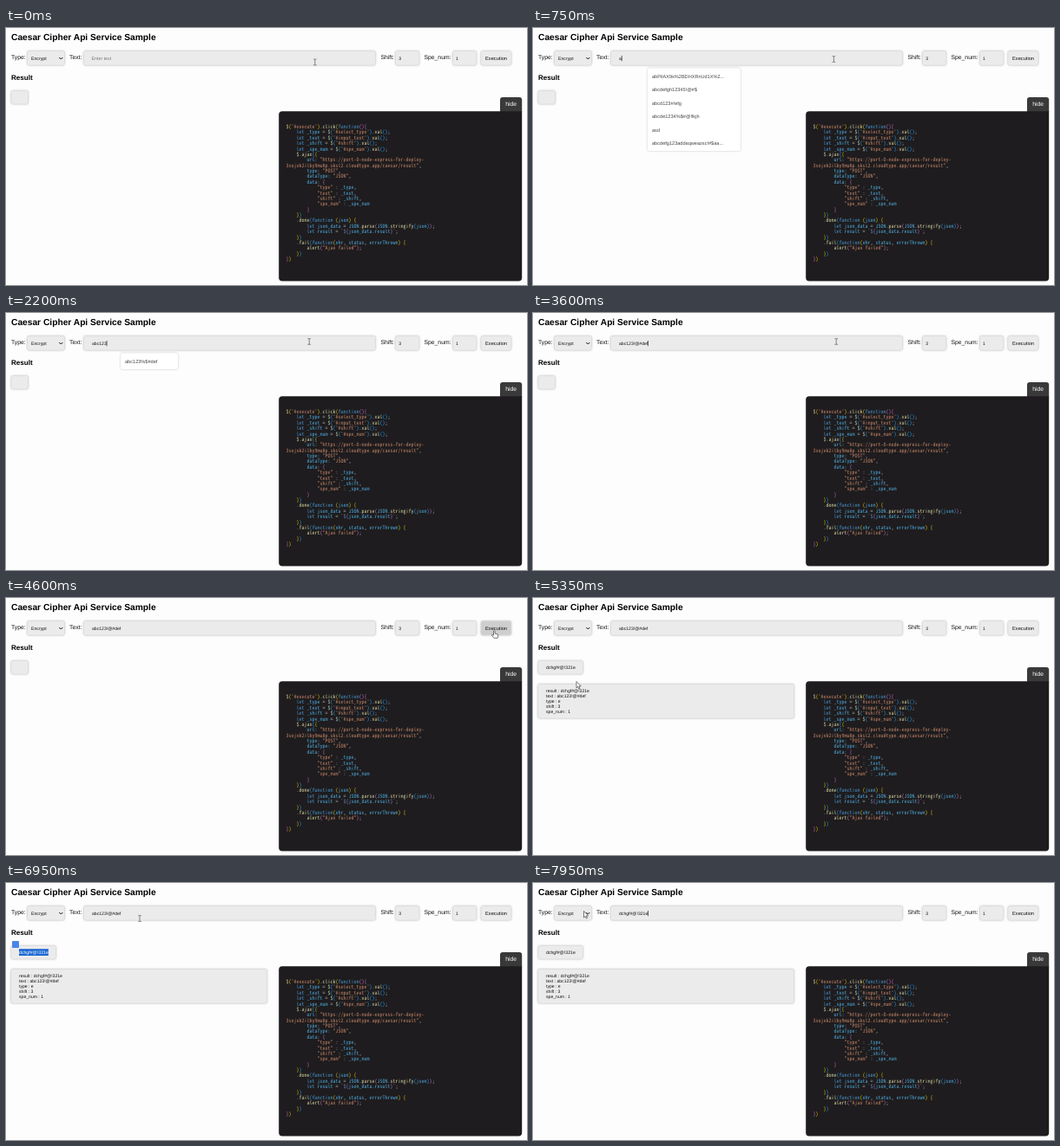
An HTML page for the animation above (8000 ms loop, 600 by 297 pixels).

```html
<!DOCTYPE html>
<html lang="en">
<head>
<meta charset="utf-8">
<title>Caesar Cipher Api Service Sample</title>
<style>
html, body { margin: 0; width: 100%; height: 100%; overflow: hidden; background: #fdfdfd; }
svg { display: block; width: 600px; height: 297px; }
text { font-family: "Liberation Sans", Arial, sans-serif; font-size: 5.1px; fill: #111; white-space: pre; text-rendering: geometricPrecision; }
.h { font-weight: bold; fill: #000; }
.label { font-size: 6.8px; }
.field { fill: #ecebec; stroke: #dad9da; stroke-width: .6; filter: drop-shadow(0 0 .8px #ccc); }
.menu { fill: #fff; filter: drop-shadow(0 .5px .8px #c4c4c4); }
.item { font-size: 5.6px; fill: #444; }
.code text { font-family: "Noto Sans Mono CJK KR", "Noto Sans Mono CJK JP", "Noto Sans Mono CJK SC", "Liberation Mono", monospace; font-size: 6px; }
</style>
</head>
<body>
<svg id="stage" viewBox="0 0 600 297"></svg>
<script>
const LOOP = 8000, STEP = 50;
const PLAIN = 'abc123!@#def', CIPHER = 'dchgf#@!321e';
const stage = document.getElementById('stage');

function add(tag, attrs, parent = stage, content) {
  const el = document.createElementNS('http://www.w3.org/2000/svg', tag);
  for (const k in attrs) el.setAttribute(k, attrs[k]);
  if (content !== undefined) el.textContent = content;
  parent.appendChild(el);
  return el;
}
const label = (x, y, s, attrs = {}, parent) => add('text', { x, y, ...attrs }, parent, s);
const box = (x, y, width, height, attrs = {}, parent) =>
  add('rect', { x, y, width, height, rx: 2.2, class: 'field', ...attrs }, parent);
const show = (el, on) => el.setAttribute('visibility', on ? 'visible' : 'hidden');
const setText = (el, s) => { if (el.textContent !== s) el.textContent = s; };

// Form
label(6, 13.8, 'Caesar Cipher Api Service Sample', { class: 'h', style: 'font-size:10.22px' });
[[6, 'Type:'], [73, 'Text:'], [431.5, 'Shift:'], [481.5, 'Spe_num:']]
  .forEach(([x, s]) => label(x, 36.4, s, { class: 'label' }));
box(24.5, 26.6, 43, 16.4);
label(29, 36.6, 'Encrypt', { style: 'font-size:5.2px' });
add('path', { d: 'M61.3 34l2 2 2-2', fill: 'none', stroke: '#111', 'stroke-width': 1 });
box(89.5, 26.6, 336, 16.4);
box(448.5, 26.6, 27.3, 16.4);
label(452.3, 36.8, '3');
box(514.5, 26.6, 27.3, 16.4);
label(518, 36.8, '1');
const button = box(547, 26.6, 34.8, 16.4);
label(552, 36.6, 'Execution', { style: 'font-size:5.7px' });
const hint = label(98.5, 36.6, 'Enter text', { style: 'font-size:5.3px;fill:#777' });
const mark = add('rect', { y: 31, height: 8, fill: '#1967d2' });
const typed = label(99, 36.6, '');
const caret = add('rect', { y: 32, width: .6, height: 6.2, fill: '#000' });

// Result
label(6, 60.4, 'Result', { class: 'h', style: 'font-size:8.1px' });
const resultBox = box(6, 72.4, 19.5, 15.5);
const answer = add('g', {});
const picked = add('rect', { y: 76.2, height: 7.8, fill: '#1967d2' }, answer);
const output = add('text', { x: 15, y: 82, style: 'font-size:5.2px' }, answer);
const head = add('tspan', {}, output);
const tail = add('tspan', { fill: '#fff' }, output);
box(5.7, 99.5, 295, 39.5, {}, answer);
['result : ' + CIPHER, 'text : ' + PLAIN, 'type : e', 'shift : 3', 'spe_num : 1']
  .forEach((s, i) => label(15, 109 + 6 * i, s, {}, answer));
const badge = add('rect', { x: 7, y: 67, width: 8, height: 8, rx: 1, fill: '#4a86e8' });

// Code panel
add('path', { d: 'M569 97V83q0-3 3-3h19.2q3 0 3 3v14z', fill: '#3a393a' });
label(575.3, 90, 'hide', { class: 'label', style: 'fill:#fff' });
add('path', { d: 'M318.2 96.2H594.2V288.4q0 4-4 4H318.2q-4 0-4-4V100.2q0-4 4-4z', fill: '#1e1c1e' });
const code = add('g', { class: 'code' });
const lines = String.raw`$('#execute').click(function(){
    let _type = $('#select_type').val();
    let _text = $('#input_text').val();
    let _shift = $('#shift').val();
    let _spe_num = $('#spe_num').val();
    $.ajax({
        url: "https://port-0-node-express-for-deploy-
3sojxk2ilby9mu8p.sksl2.cloudtype.app/caesar/result",
        type: "POST",
        dataType: "JSON",
        data: {
            "type" : _type,
            "text" : _text,
            "shift" : _shift,
            "spe_num" : _spe_num
        }
    })
    .done(function (json) {
        let json_data = JSON.parse(JSON.stringify(json));
        let result = ~\${json_data.result}~;
    })
    .fail(function(xhr, status, errorThrown) {
        alert("Ajax failed");
    })
})`.replace(/\\/g, '').replace(/~/g, '`').split('\n');
const TOKEN = /(^3\S+"|"[^"]*"?|'[^']*'|`)|(\b(?:let|function)\b|\$(?=\{))|(\$|\w+(?=\())|([(){}])|(\w+)|([^\w$"'`(){}]+)/g;
const PAIRS = ['#e6c200', '#c868c4', '#179fff'];
const PITCH = 3;
const probe = label(0, 0, 'mmmmmmmmmm', {}, code);
code.style.letterSpacing = (PITCH - probe.getComputedTextLength() / 10).toFixed(2) + 'px';
probe.remove();
let depth = 0;
function paint(m) {
  if (m[1]) return '#c08468';
  if (m[2]) return '#4a94cc';
  if (m[3]) return '#d2d2a0';
  if (m[4]) return PAIRS[('({'.includes(m[4]) ? depth++ : --depth) % 3];
  return m[5] ? '#4fa8d8' : '#c8c8c8';
}
lines.forEach((line, i) => {
  const body = line.trimStart();
  const row = add('text', { x: 322.4 + PITCH * (line.length - body.length), y: 116 + 6.38 * i }, code);
  for (const m of body.matchAll(TOKEN)) add('tspan', { style: 'fill:' + paint(m) }, row, m[0]);
});

// Autofill menus
function menu(width, items) {
  const g = add('g', {});
  box(132, 46.3, width, 3.3 + 15.4 * items.length, { class: 'menu' }, g);
  items.forEach((s, i) => label(137, 58 + 15.4 * i, s, { class: 'item' }, g));
  return g;
}
const first = 'abPilAX9s%2BDHXRnUd1X%2...';
const common = ['abcdefgh12345!@#$', 'abcd123#!efg', 'abcde1234%$#@!lkjh'];
const long = 'abcdefg123addaqweazsc!#$aa...', last = 'abc123%$#def';
const menus = [
  [750, 950, menu(107, [first, ...common, 'asd', long])],
  [950, 1450, menu(107, [first, ...common, long, last])],
  [1450, 1650, menu(107, [...common, long, last])],
  [1650, 2250, menu(66, [last])]
];

// Pointers
const pointer = add('g', {});
const beam = add('path', { d: 'M-1.8-3.4h1.3l.5.4.5-.4h1.3M0-3V3M-1.8 3.4h1.3l.5-.4.5.4h1.3', fill: 'none', stroke: '#3a3a3a', 'stroke-width': .6 }, pointer);
const arrow = add('path', { d: 'M0 0V7.4L1.7 5.9 2.8 8.4 4 7.9 2.9 5.4H5.2z', fill: '#fff', stroke: '#222', 'stroke-width': .6 }, pointer);
const hand = add('path', { d: 'M-1-3.4q.8-1 1.6 0v3l3 .7q.8.3.7 1.2l-.6 3.3H-.6L-3 1.6q0-1 1-.8l1 .8z', fill: '#fff', stroke: '#222', 'stroke-width': .6 }, pointer);

const path = [
  [0, 355.8, 39.5], [50, 355.4, 39.3], [500, 346.4, 36], [1450, 346.4, 36],
  [1800, 349.2, 33], [3650, 349.2, 33], [4350, 537, 39], [4550, 562.5, 41.5], [4800, 562.5, 41.5],
  [5250, 50, 96.5], [5350, 50, 96.5], [5550, 76, 111], [5800, 27, 100], [6050, 50, 80],
  [6100, 50, 80], [6350, 14, 80], [6450, 14, 80], [6600, 154, 60], [6750, 154, 60],
  [6900, 154, 41], [7600, 154, 41], [7900, 58.5, 32.5], [LOOP, 58.5, 32.5]
];
const keys = [
  [0, ''], ...[750, 950, 1450, 1650, 1800, 2000, 2250, 2450, 2750, 3150, 3350, 3550]
    .map((t, i) => [t, PLAIN.slice(0, i + 1)]), [7500, CIPHER]
];
const EXEC = 4800, DRAG = 6100, DRAG_END = 6350, UNPICK = 7050, ALL = 7250, PASTE = 7500;

function place(t) {
  const i = Math.max(1, path.findIndex(p => p[0] > t));
  const [a, x, y] = path[i - 1], [b, u, v] = path[i];
  const k = (t - a) / (b - a), e = k * k * (3 - 2 * k);
  return [x + (u - x) * e, y + (v - y) * e];
}
const within = (x, y, l, t, r, b) => x >= l && x <= r && y >= t && y <= b;

function draw(t) {
  const [x, y] = place(t);
  const onButton = within(x, y, 547, 26, 582, 44);
  const onText = within(x, y, 89, 26, 426, 44) || within(x, y, 448, 26, 476, 44) ||
    within(x, y, 514, 26, 542, 44) || (t >= 6000 && within(x, y, 13, 75, 52, 86));
  pointer.setAttribute('transform', `translate(${x} ${y})`);
  show(hand, onButton);
  show(beam, onText);
  show(arrow, !onButton && !onText);
  button.style.fill = onButton ? '#cfcecf' : '';

  const [since, text] = keys.filter(k => k[0] <= t).pop();
  setText(typed, text);
  show(hint, !text);
  const width = text ? typed.getComputedTextLength() : 0;
  const all = t >= ALL && t < PASTE;
  show(mark, all);
  mark.setAttribute('x', 99);
  mark.setAttribute('width', width);
  typed.style.fill = all ? '#fff' : '';
  const focus = (t >= 500 && t < 4550) || (t >= UNPICK && !all);
  const from = t >= UNPICK && t < PASTE ? UNPICK : Math.max(since, 500);
  caret.setAttribute('x', 99 + width);
  show(caret, focus && (t - from) % 1000 < 500);
  for (const [a, b, el] of menus) show(el, t >= a && t < b);

  const done = t >= EXEC;
  resultBox.setAttribute('width', done ? 51.5 : 19.5);
  answer.setAttribute('display', done ? 'inline' : 'none');
  const part = t < DRAG || t >= UNPICK ? 0 : Math.min(1, (t - DRAG) / (DRAG_END - DRAG));
  const cut = Math.round(CIPHER.length * (1 - part * part * (3 - 2 * part)));
  setText(head, CIPHER.slice(0, cut));
  setText(tail, CIPHER.slice(cut));
  if (done) {
    const left = cut ? output.getSubStringLength(0, cut) : 0;
    picked.setAttribute('x', 15 + left);
    picked.setAttribute('width', Math.max(0, output.getComputedTextLength() - left));
  }
  show(badge, t >= 6450 && t < UNPICK);
}

const start = performance.now();
function tick() {
  const t = (performance.now() - start) % LOOP;
  draw(Math.floor(t / STEP) * STEP);
  requestAnimationFrame(tick);
}
draw(0);
requestAnimationFrame(tick);
</script>
</body>
</html>
```
